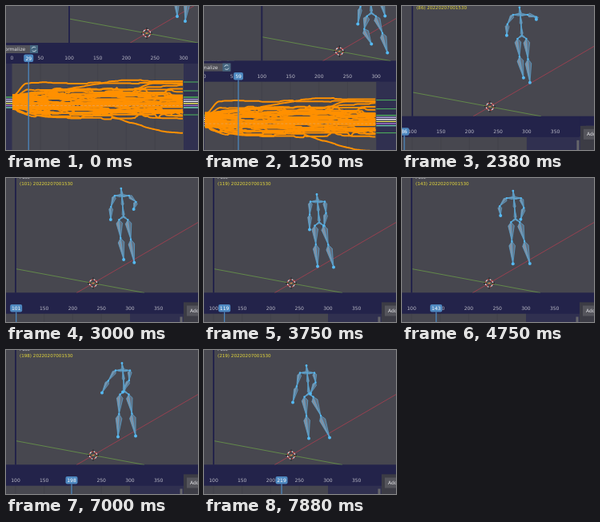
Recreate the animation shown at these times as an HTML page with a canvas. Size 240 px wide and 180 px high, loop 8000 ms.

```html
<!DOCTYPE html>
<html lang="en">
<head>
<meta charset="utf-8">
<title>Armature playback</title>
<style>
html, body { margin: 0; width: 100%; height: 100%; overflow: hidden; background: #47474f; }
canvas { display: block; width: 240px; height: 180px; }
</style>
</head>
<body>
<canvas id="stage" width="240" height="180"></canvas>
<script>
const c = document.getElementById('stage').getContext('2d');
const LOOP = 8000, STEP = 125;
const NAVY = '#23234a', GRAY = '#47474f', ORANGE = '#ff9000';

// Key poses: time, hip, hands and feet; all other joints follow from these
const keys = [
  { t: 0,    hip: [156, 62], hands: [[142, 70], [170, 70]], feet: [[147, 111], [157, 117]] },
  { t: 1250, hip: [149, 84], hands: [[132, 98], [166, 88]], feet: [[149, 123], [169, 134]] },
  { t: 2375, hip: [149, 43], hands: [[130, 43], [167, 23]], feet: [[151, 96], [159, 102]] },
  { t: 3750, hip: [144, 56], hands: [[132, 65], [150, 61]], feet: [[142, 111], [162, 112]] },
  { t: 5625, hip: [140, 48], hands: [[116, 33], [147, 45]], feet: [[136, 105], [158, 104]] },
  { t: 7000, hip: [148, 52], hands: [[120, 54], [146, 53]], feet: [[140, 109], [162, 108]] },
  { t: 7875, hip: [131, 55], hands: [[111, 66], [133, 55]], feet: [[131, 111], [157, 110]] }
];

const smooth = (t, a, b) => {
  const u = Math.min(1, Math.max(0, (t - a) / (b - a)));
  return u * u * (3 - 2 * u);
};
const mix = (p, q, u) => p.map((v, i) => v + (q[i] - v) * u);
const shift = ([x, y], dx, dy) => [x + dx, y + dy];
const frameX = f => 7.5 + f * 0.7147;

function rect(x, y, w, h, color) {
  c.fillStyle = color;
  c.fillRect(x, y, w, h);
}
function line(x1, y1, x2, y2, color, width = 1) {
  c.strokeStyle = color;
  c.lineWidth = width;
  c.beginPath();
  c.moveTo(x1, y1);
  c.lineTo(x2, y2);
  c.stroke();
}
function text(s, x, y, color, size = 6, align = 'left') {
  c.font = size + 'px "DejaVu Sans", sans-serif';
  c.textAlign = align;
  c.fillStyle = color;
  c.fillText(s, x, y);
}

// Animation curves: an eased trend plus seeded steps
let seed = 11;
const rnd = () => (seed = seed * 16807 % 2147483647) / 2147483647;
function curve(start, change, from, to, jump) {
  const path = new Path2D();
  let goal = 0, step = 0;
  for (let x = 8; x <= 222; x += 1.5) {
    if (rnd() < 0.12) goal = goal * 0.7 + (rnd() - 0.5) * jump;
    step += (goal - step) * 0.6;
    path.lineTo(x, start + change * smooth(x, from, to) + step);
  }
  return path;
}
const curves = [
  curve(112, -16, 8, 26, 2),
  curve(111, -17, 10, 150, 2),
  curve(114, -10, 8, 30, 2),
  curve(113, -16, 140, 185, 3),
  curve(128, 29, 80, 215, 2)
];
for (let i = 0; i < 34; i++) {
  const side = i / 33 - 0.5;
  curves.push(curve(120 + 18 * side, 12 * side + 2, 8, 30 + rnd() * 80, 3 + 10 * Math.abs(side)));
}

function poseAt(t) {
  const i = Math.max(0, keys.findLastIndex((k, n) => k.t <= t && n < keys.length - 1));
  const a = keys[i], b = keys[i + 1];
  const u = smooth(t, a.t, b.t);
  const pair = name => [0, 1].map(s => mix(a[name][s], b[name][s], u));
  return { hip: mix(a.hip, b.hip, u), hands: pair('hands'), feet: pair('feet') };
}

function bone([x1, y1], [x2, y2], w) {
  const dx = x2 - x1, dy = y2 - y1, len = Math.hypot(dx, dy) || 1;
  const mx = x1 + dx * 0.2, my = y1 + dy * 0.2;
  const nx = -dy / len * w, ny = dx / len * w;
  const half = (side, fill) => {
    c.beginPath();
    c.moveTo(x1, y1);
    c.lineTo(mx + nx * side, my + ny * side);
    c.lineTo(x2, y2);
    c.closePath();
    c.fillStyle = fill;
    c.fill();
    c.stroke();
  };
  c.lineWidth = 0.7;
  c.strokeStyle = '#5aabdc';
  half(1, '#858f9e');
  half(-1, '#667080');
}

function dot([x, y], r) {
  c.fillStyle = '#55b9f2';
  c.beginPath();
  c.arc(x, y, r, 0, 7);
  c.fill();
}

// Two bones whose middle joint moves outward as the limb shortens
function limb(root, end, side, length, w) {
  const reach = Math.hypot(end[0] - root[0], end[1] - root[1]);
  const bend = Math.min(6, Math.max(0, length - reach) * 0.4);
  const joint = shift(mix(root, end, 0.46), side * bend, 0);
  bone(root, joint, w);
  bone(joint, end, w);
  dot(root, 1.2);
  dot(joint, 1.2);
  dot(end, 2);
}

function skeleton(t) {
  const { hip, hands, feet } = poseAt(t);
  const neck = shift(hip, -2, -26), head = shift(neck, -1, -9);
  const mid = mix(hip, neck, 0.5);
  bone(hip, mid, 1.5);
  bone(mid, neck, 1.5);
  bone(neck, head, 1.6);
  dot(head, 1.4);
  [-1, 1].forEach((side, i) => {
    const shoulder = shift(neck, side * 9, 0), top = shift(hip, side * 5.5, 4);
    bone(neck, shoulder, 1.6);
    bone(hip, top, 1);
    limb(shoulder, hands[i], side, 36, 2.4);
    limb(top, feet[i], side, 52, 3.8);
  });
}

function cursor(x, y) {
  c.lineWidth = 1.2;
  for (let i = 0; i < 12; i++) {
    c.strokeStyle = i % 2 ? '#e9e4e4' : '#d8504c';
    c.beginPath();
    c.arc(x, y, 4.6, i * Math.PI / 6, (i + 1) * Math.PI / 6);
    c.stroke();
  }
  for (const [dx, dy] of [[1, 0], [-1, 0], [0, 1], [0, -1]])
    line(x + dx * 3, y + dy * 3, x + dx * 7, y + dy * 7, '#17171c', 0.9);
  rect(x - 0.8, y - 0.8, 1.6, 1.6, '#f0a050');
}

function viewport(t, frame) {
  rect(-20, -110, 340, 156, GRAY);
  line(79, 16, 240, 46, '#66904a', 0.9);
  line(155, 46.2, 310, -43.7, '#a04050', 0.9);
  cursor(176, 34);
  c.save();
  c.translate(67, -98);
  skeleton(t);
  c.restore();
  text('Pose', 84, -97, '#d8d8dc', 5.6);
  text(`(${frame}) 20220207001530`, 84, -88.2, '#e3d63c', 5.6);
  rect(78, -110, 2, 156, NAVY);
}

function graph(frame) {
  rect(-20, 72, 309, 130, '#303050');
  rect(7.5, 72, 214.5, 130, GRAY);
  for (let f = 50; f < 300; f += 50) line(frameX(f), 72, frameX(f), 200, '#414149', 0.7);

  const hues = ['#4fb95c', '#b0a4dc', '#e4e4e8', '#e4e45a', '#a070d0', '#6fd0b0'];
  hues.forEach((color, i) => {
    const y = 114 + 2.6 * i;
    line(222, y, 288, y, color, 1.4);
    line(-20, y, 8, y, color, 1.4);
  });
  for (const y of [95, 106, 136]) line(222, y, 288, y, hues[0]);

  c.strokeStyle = ORANGE;
  c.lineWidth = 2;
  c.lineJoin = 'round';
  curves.forEach(p => c.stroke(p));
  c.setLineDash([3, 2]);
  line(8, 124.5, 222, 124.5, '#dca878', 0.6);
  c.setLineDash([]);

  rect(-20, 46, 309, 26, NAVY);
  rect(289, 46, 40, 12, NAVY);
  rect(-20, 49, 60, 10, '#505058');
  text('Normalize', -6, 56, '#e0e0e4');
  rect(30, 49, 10, 10, '#466680');
  c.strokeStyle = '#c4d8e4';
  c.lineWidth = 1;
  for (const a of [0.3, 3.4]) {
    c.beginPath();
    c.arc(35, 54, 2.8, a, a + 2.2);
    c.stroke();
  }

  for (let f = 0; f <= 350; f += 50) text(f, frameX(f), 67.3, '#bcbcc8', 6, 'center');

  const x = frameX(frame), w = frame > 99 ? 15 : 12;
  line(x, 70, x, 200, '#4c86bd', 1.3);
  c.fillStyle = '#4e88c0';
  c.beginPath();
  c.roundRect(x - w / 2, 60.5, w, 9.5, 2);
  c.fill();
  text(frame, x, 67.5, '#fff', 6, 'center');

  rect(284.5, 76, 3, 120, '#66666a');
  rect(289, 58, 40, 140, '#3c3c45');
  rect(293, 62, 40, 13, '#55555c');
  text('Add', 297, 70.5, '#e4e4e8');
}

function draw(now) {
  const n = Math.floor((now % LOOP + 1) / STEP) % (LOOP / STEP);
  const t = n * STEP;
  const frame = 29 + 3 * n + (n > 42 ? 1 : 0);
  c.setTransform(1, 0, 0, 1, 0, 0);
  c.translate(-67 * smooth(t, 950, 2480), 97.5 * smooth(t, 600, 2680));
  viewport(t, frame);
  graph(frame);
  requestAnimationFrame(() => draw(performance.now() - begin));
}
const begin = performance.now();
draw(0);
</script>
</body>
</html>
```
